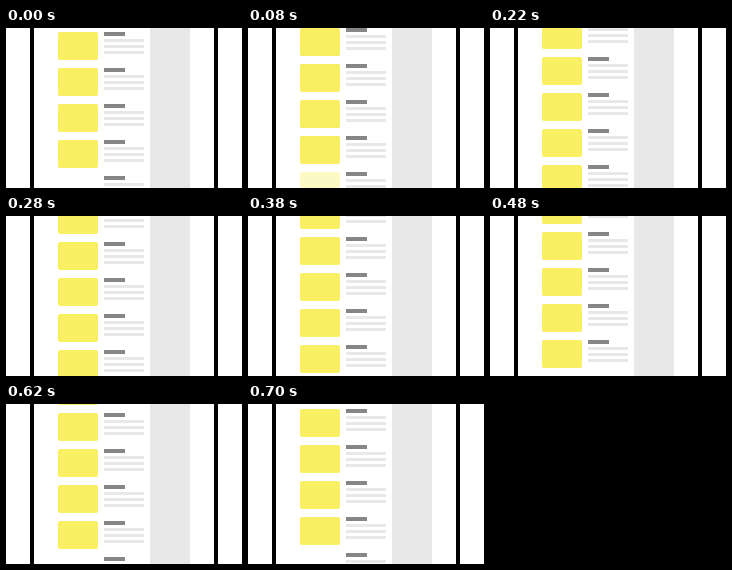
An HTML page for the animation above (720 ms loop, 236 by 160 pixels).

```html
<!DOCTYPE html>
<html lang="en">
<head>
<meta charset="utf-8">
<title>Scrolling list</title>
<style>
  html, body { margin: 0; width: 100%; height: 100%; overflow: hidden; background: #fff; }
  #stage { position: relative; width: 236px; height: 160px; overflow: hidden; }
  #stage div { position: absolute; }
  .edge { top: 0; width: 4px; height: 160px; background: #000; }
  .aside { left: 144px; top: 0; width: 40px; height: 160px; background: #e8e8e8; }
  #list { left: 52px; top: 4px; width: 86px; }
  .thumb { left: 0; top: 0; width: 40px; height: 28px; border-radius: 2px; background: #f9ef62; }
  .title { left: 46px; top: 0; width: 21px; height: 4px; background: #868686; }
  .line { left: 46px; width: 40px; height: 3px; background: #e8e8e8; }
</style>
</head>
<body>
<div id="stage">
  <div class="edge" style="left:24px"></div>
  <div class="edge" style="left:208px"></div>
  <div class="aside"></div>
  <div id="list"></div>
</div>
<script>
  const LOOP = 720, TICK = 20, PITCH = 36, FADE = 220;
  const list = document.getElementById('list');

  function add(parent, name, top) {
    const el = document.createElement('div');
    el.className = name;
    el.style.top = top + 'px';
    return parent.appendChild(el);
  }

  const thumbs = [];
  for (let i = 0; i < 6; i++) {
    const row = add(list, 'row', i * PITCH);
    thumbs.push(add(row, 'thumb', 0));
    add(row, 'title', 0);
    for (const y of [7, 13, 19]) add(row, 'line', y);
  }

  const timing = { duration: LOOP, iterations: Infinity };

  // One row pitch per loop, one pixel per tick
  list.animate([
    { transform: 'translateY(0)', easing: `steps(${LOOP / TICK}, end)` },
    { transform: `translateY(${-PITCH}px)` }
  ], timing);

  // The entering thumbnail fades in; the next one is still waiting
  thumbs[4].animate([
    { opacity: 0, easing: `steps(${FADE / TICK}, end)` },
    { opacity: 1, offset: FADE / LOOP },
    { opacity: 1 }
  ], timing);
  thumbs[5].style.opacity = 0;
</script>
</body>
</html>
```
